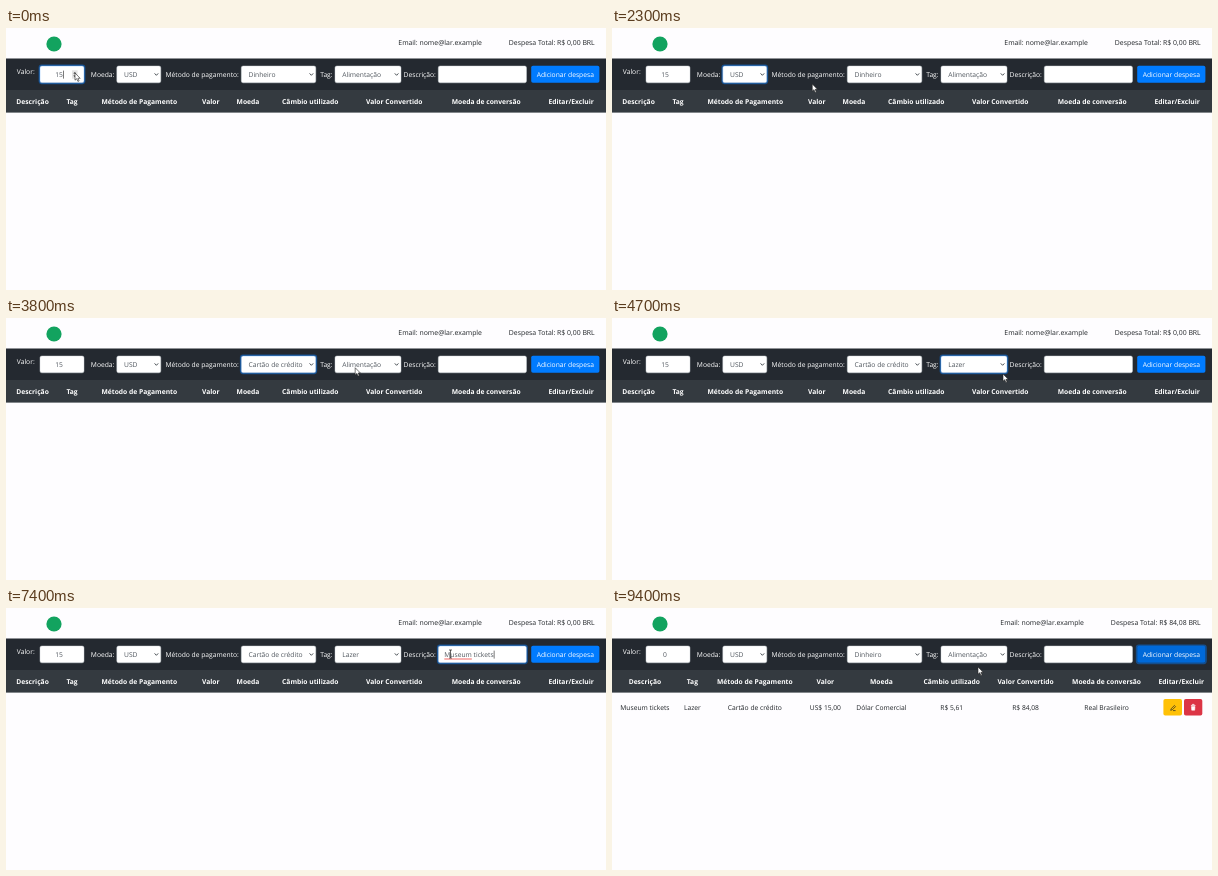
Write an HTML page that moves like this. It is 600x262 px and loops after 9.5 s.

```html
<!DOCTYPE html>
<html lang="pt-BR">
<head>
<meta charset="utf-8">
<title>Controle de despesas</title>
<style>
  html, body { margin: 0; width: 100%; height: 100%; overflow: hidden; background: #fefdff; }
  svg { display: block; width: 100vw; height: 100vh; }
  text { font: 6.72px "Open Sans", "Noto Sans", sans-serif; text-rendering: geometricPrecision; }
  .b { font-weight: 700; }
  .m { text-anchor: middle; }
  .e { text-anchor: end; }
  .top { font-size: 6.9px; }
</style>
</head>
<body>
<svg id="stage" viewBox="0 0 600 262"></svg>
<script>
const LOOP = 9500, STEP = 100;
const FONT = '6.72px "Open Sans", "Noto Sans", sans-serif';
const INK = '#212529', GREY = '#50575e';
const stage = document.getElementById('stage');
const pen = document.createElement('canvas').getContext('2d');

function widthOf(s, weight = 400) {
  pen.font = `${weight} ${FONT}`;
  return pen.measureText(s).width;
}

// Moments of the story, in ms
const VALUE_BLUR = 1100, DESC_FOCUS = 5400, ADD = 9000, SAVED = 9100;
const TYPE_START = 5970, KEY = 102, BLINK = 500;
const phrase = 'Museum tickets';

const selects = [
  { label: 'Moeda:', x: 110.8, w: 44, focus: VALUE_BLUR, open: 1300, close: 2100, blur: 2700, pick: 0,
    items: 'USD CAD EUR GBP ARS BTC LTC JPY CHF AUD CNY ILS ETH XRP'.split(' ') },
  { label: 'Método de pagamento:', x: 235.3, w: 74.5, focus: 2700, open: 2800, close: 3500, blur: 3900, pick: 1,
    items: ['Dinheiro', 'Cartão de crédito', 'Cartão de débito'] },
  { label: 'Tag:', x: 329, w: 66, focus: 3900, open: 4000, close: 4700, blur: DESC_FOCUS, pick: 1,
    items: ['Alimentação', 'Lazer', 'Trabalho', 'Transporte', 'Saúde'] }
];

// Pointer moves, each easing to a new resting place
const moves = [
  { from: 300, to: 1100, x: 140, y: 48 },
  { from: 1300, to: 1600, x: 138.5, y: 64 },
  { from: 2100, to: 2500, x: 262, y: 48 },
  { from: 2700, to: 3000, x: 264.5, y: 64.4 },
  { from: 3400, to: 3900, x: 359, y: 48 },
  { from: 4000, to: 4400, x: 368, y: 69 },
  { from: 4500, to: 4700, x: 391, y: 56 },
  { from: 4700, to: 5300, x: 444.5, y: 46 },
  { from: 8100, to: 8700, x: 551.2, y: 46.3 },
  { from: 9200, to: 9400, x: 366, y: 59 }
];

const heads = ['Descrição', 'Tag', 'Método de Pagamento', 'Valor', 'Moeda', 'Câmbio utilizado',
  'Valor Convertido', 'Moeda de conversão', 'Editar/Excluir'];
const row = [phrase, 'Lazer', 'Cartão de crédito', 'US$ 15,00', 'Dólar Comercial', 'R$ 5,61',
  'R$ 84,08', 'Real Brasileiro', ''];

const rect = (x, y, w, h, fill, extra = '') =>
  `<rect x="${x}" y="${y}" width="${w}" height="${h}" fill="${fill}" ${extra}/>`;
const line = (d, color, width = 0.8, fill = 'none') =>
  `<path d="${d}" fill="${fill}" stroke="${color}" stroke-width="${width}" stroke-linejoin="round"/>`;
const text = (x, y, s, fill = INK, cls = '') =>
  `<text x="${x}" y="${y}" fill="${fill}" class="${cls}">${s.replace(/ /g, '\u00a0')}</text>`;
const between = (t, a, b) => t >= a && t < b;
const ease = k => k * k * (3 - 2 * k);

function pointerAt(t) {
  let x = 69, y = 45;
  for (const m of moves) {
    const k = ease(Math.min(1, Math.max(0, (t - m.from) / (m.to - m.from))));
    x += (m.x - x) * k;
    y += (m.y - y) * k;
  }
  return { x, y };
}

// Columns share the full width in proportion to their padded content
function columnCenters(saved) {
  const widths = heads.map((h, i) => 8.8 + Math.max(widthOf(h, 700), saved ? widthOf(row[i]) : 0));
  const scale = 600 / widths.reduce((a, b) => a + b);
  let left = 0;
  return widths.map(w => (left += w * scale) - w * scale / 2);
}

const ring = (x, w) =>
  rect(x - 0.7, 37.3, w + 1.4, 18.2, 'none', 'rx="2.4" stroke="#007bff" stroke-opacity=".45" stroke-width="1.4"');
const field = (x, w, focused) => (focused ? ring(x, w) : '') +
  rect(x, 38, w, 16.8, '#fff', `rx="1.8" stroke="${focused ? '#80bdff' : '#ced4da'}" stroke-width=".45"`);
const label = (x, s) => text(x - 2.4, 49, s, '#fff', 'e');
const caret = x => rect(x, 42.6, 0.6, 8, '#222');

function header(saved) {
  return '<circle cx="48" cy="16" r="7.6" fill="#12a35f"/>' +
    text(saved ? 388.3 : 392.3, 17.2, 'Email: nome@lar.example', INK, 'top') +
    text(588.7, 17.2, `Despesa Total: R$ ${saved ? '84,08' : '0,00'} BRL`, INK, 'e top');
}

function valueField(t, saved) {
  let out = text(10.8, 45.7, 'Valor:', '#fff') + field(34, 44, t < VALUE_BLUR) +
    text(53, 49, saved ? '0' : '15', GREY, 'm');
  if (t < BLINK) {
    out += caret(57) + rect(66, 42.3, 5.6, 8.4, '#e4e4e4') +
      line('M67.6 45.4l1.2 -1.4l1.2 1.4ZM67.6 47.6l1.2 1.4l1.2 -1.4Z', '#555', 0.3, '#555');
  }
  return out;
}

function selectBox(s, t) {
  const value = s.items[between(t, s.close, SAVED) ? s.pick : 0];
  return label(s.x, s.label) + field(s.x, s.w, between(t, s.focus, s.blur)) +
    text(s.x + 7.2, 49, value, GREY) +
    line(`M${s.x + s.w - 6.2} 45.4l1.8 1.9l1.8 -1.9`, '#343a40', 0.9);
}

function dropdown(s, p) {
  const pitch = 9.68, top = 55.2, h = s.items.length * pitch + 0.6;
  const hot = Math.max(0, Math.min(s.items.length - 1, Math.floor((p.y - top) / pitch)));
  const item = (name, i) => {
    const y = top + 0.2 + i * pitch;
    return (i === hot ? rect(s.x + 0.3, y, s.w - 0.6, pitch, '#1a8cff') : '') +
      text(s.x + 7.4, y + 7.2, name, i === hot ? '#fff' : GREY);
  };
  return rect(s.x + 0.6, top + 1, s.w + 0.8, h + 0.8, '#000', 'opacity=".22" rx=".6"') +
    rect(s.x, top, s.w, h, '#fff', 'stroke="#777" stroke-width=".6"') + s.items.map(item).join('');
}

function description(t, saved) {
  const x = 438.3, active = between(t, DESC_FOCUS, ADD);
  const count = Math.min(phrase.length, Math.max(0, Math.floor((t - TYPE_START) / KEY)));
  const typed = saved ? '' : phrase.slice(0, count);
  const lastKey = count ? TYPE_START + count * KEY : DESC_FOCUS;
  let out = label(432.3, 'Descrição:') + field(432.3, 88.2, active) + text(x, 49, typed, GREY);
  if (typed.includes(' ')) out += rect(x, 50.6, widthOf('Museum'), 0.8, '#f0403c');
  if (active && t - lastKey < BLINK) out += caret(x + widthOf(typed) + 0.2);
  return out;
}

function addButton(t) {
  return (t >= ADD ? ring(525.2, 68.2) : '') +
    rect(525.2, 37.8, 68.2, 17, t > 8700 ? '#0069d9' : '#007bff', 'rx="1.8"') +
    text(559.3, 49, 'Adicionar despesa', '#fff', 'm');
}

function expense(cols) {
  return row.map((s, i) => text(cols[i], 101.7, s, INK, 'm')).join('') +
    rect(551.4, 91, 18.6, 16.6, '#ffc107', 'rx="1.8"') +
    rect(572, 91, 18.3, 16.6, '#dc3545', 'rx="1.8"') +
    line('M558.7 102.3l.5 -1.6l3.2 -3.2l1.1 1.1l-3.2 3.2ZM561 102.6h2.6', INK, 0.7) +
    line('M578.9 97.6h4.6M580.3 97v-.6h1.8v.6', '#fff', 0.8) +
    line('M579.4 98.6h3.6l-.3 3.6h-3Z', '#fff', 0.5, '#fff');
}

function pointer(p) {
  const inBar = between(p.y, 38, 55);
  let shape;
  if (inBar && between(p.x, 433, 521)) {
    shape = line('M-1.5 -4h3M0 -4v8M-1.5 4h3', '#222', 0.7);
  } else if (inBar && between(p.x, 525, 594)) {
    shape = line('M-.8 .5Q0 -.5 .8 .5V3.5L3.5 4.2Q4.2 4.6 4 5.8L3.2 8.6H-1L-3 5.6Q-2.8 4.5 -1.7 5.1L-.8 6Z',
      '#111', 0.6, '#fff');
  } else {
    shape = line('M0 0V7.2L1.7 5.7L2.9 8.4L4.1 7.9L2.9 5.3H5.2Z', '#222', 0.6, '#fff');
  }
  return `<g transform="translate(${p.x} ${p.y})">${shape}</g>`;
}

function draw(t) {
  const saved = t >= SAVED, p = pointerAt(t), cols = columnCenters(saved);
  const opened = selects.find(s => between(t, s.open, s.close));
  stage.innerHTML = header(saved) +
    rect(0, 30.5, 600, 32, '#242930') + rect(0, 62, 600, 22.6, '#343a40') +
    valueField(t, saved) + selects.map(s => selectBox(s, t)).join('') +
    description(t, saved) + addButton(t) +
    heads.map((s, i) => text(cols[i], 75.6, s, '#fff', 'b m')).join('') +
    (saved ? expense(cols) : '') + (opened ? dropdown(opened, p) : '') + pointer(p);
}

const start = performance.now();
let shown = -1;
function tick() {
  const t = Math.floor((performance.now() - start) % LOOP / STEP) * STEP;
  if (t !== shown) draw(shown = t);
  requestAnimationFrame(tick);
}
tick();
</script>
</body>
</html>
```
